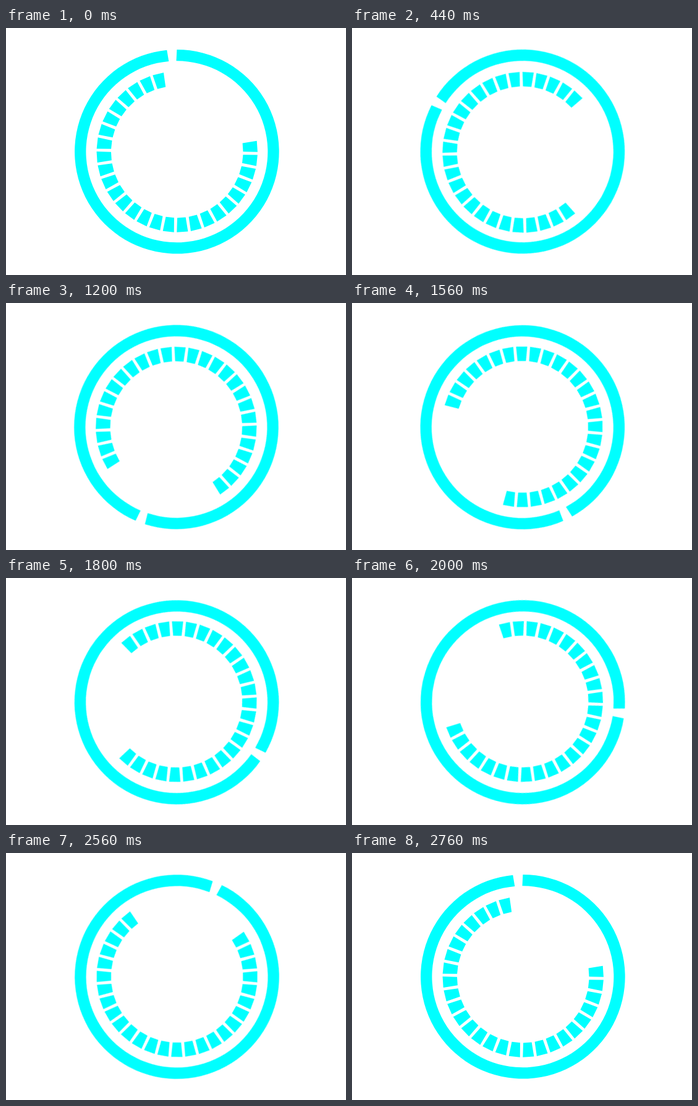
Animation of 550x400 px, one loop 2.8 s. Source, as an HTML page:

```html
<!DOCTYPE html>
<html lang="en">
<head>
<meta charset="utf-8">
<title>Counter-rotating rings</title>
<style>
  html, body { margin: 0; width: 100%; height: 100%; overflow: hidden; background: #fff; }
  svg { display: block; width: 550px; height: 400px; }
  path { fill: #0ff; transform-origin: 276px 200.7px; }
</style>
</head>
<body>
<svg viewBox="0 0 550 400">
  <path id="ring"/>
  <path id="ticks"/>
</svg>
<script>
  const $ = id => document.getElementById(id);

  // Point at a clockwise angle from the top, in degrees.
  const polar = ([x, y], r, deg) => {
    const a = deg * Math.PI / 180;
    return `${(x + r * Math.sin(a)).toFixed(2)} ${(y - r * Math.cos(a)).toFixed(2)}`;
  };

  // Both shapes sit slightly off the pivot, which gives a faint wobble.
  const ringCenter = [276.4, 200.3];
  const tickCenter = [276.75, 200.6];

  const ringPath = (outer, inner) =>
    `M${polar(ringCenter, outer, 0)}` +
    `A${outer} ${outer} 0 1 1 ${polar(ringCenter, outer, -5.6)}` +
    `L${polar(ringCenter, inner, -5.1)}` +
    `A${inner} ${inner} 0 1 0 ${polar(ringCenter, inner, -0.35)}Z`;

  const tickPath = (outer, inner, mid) => {
    const at = (r, d) => polar(tickCenter, r, mid + d);
    return `M${at(outer, -4)}L${at(outer, 4)}L${at(inner, 3.65)}L${at(inner, -3.65)}Z`;
  };

  $('ring').setAttribute('d', ringPath(165.3, 147));
  $('ticks').setAttribute('d',
    Array.from({ length: 27 }, (_, i) => tickPath(130.2, 106.8, 86.1 + i * 10.01)).join(''));

  // 70 poses of 40 ms; the last one equals the first.
  const spin = (id, turn) => $(id).animate(
    { transform: ['rotate(0deg)', `rotate(${turn}deg)`] },
    { duration: 2800, iterations: Infinity, easing: 'steps(70, jump-none)' });

  spin('ring', -360);
  spin('ticks', 360);
</script>
</body>
</html>
```
